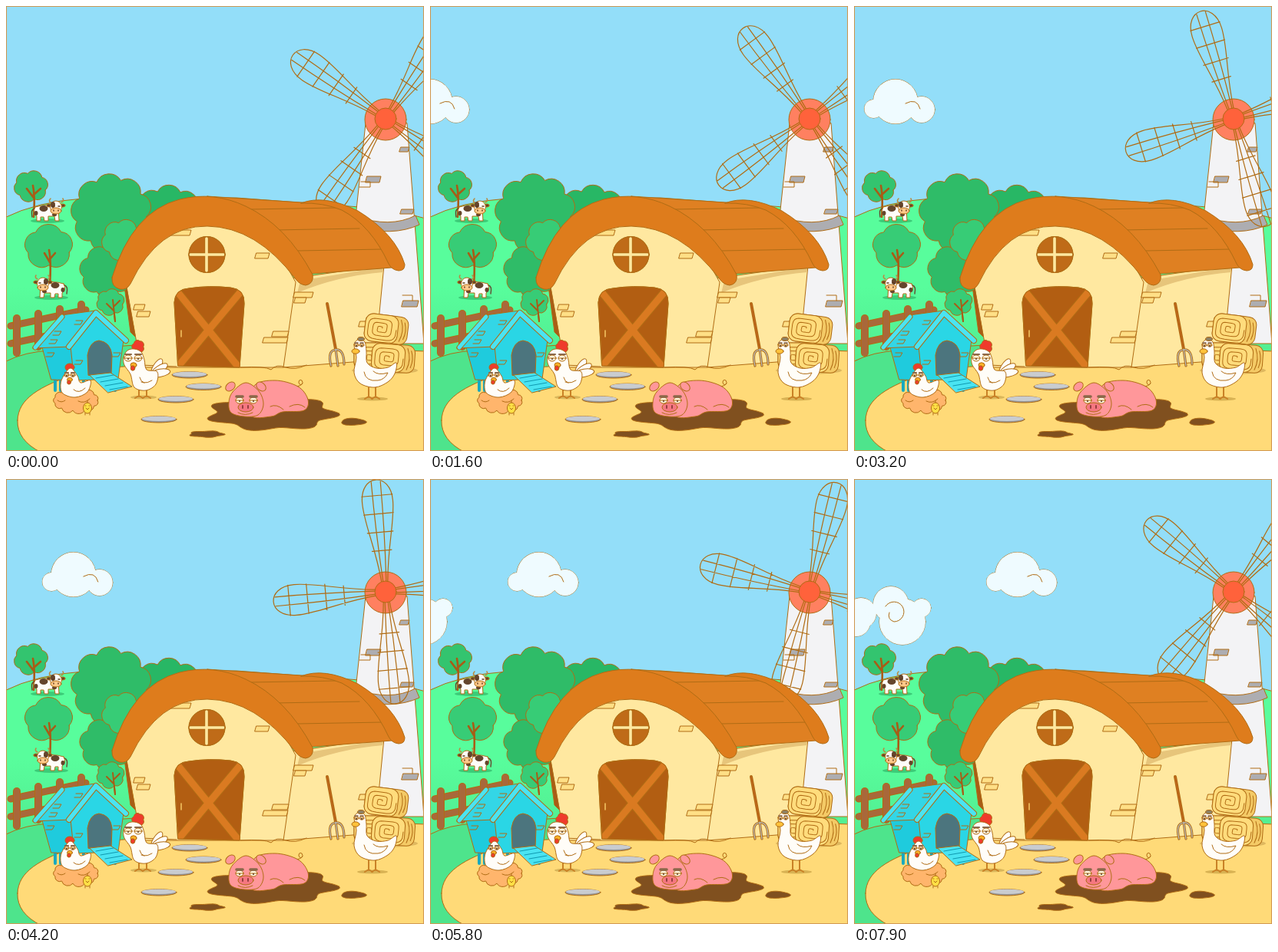
An HTML page that plays this animation: 544 px wide and 580 px high, repeating every 8 s.

```html
<!DOCTYPE html>
<html lang="en">
<head>
<meta charset="utf-8">
<title>Farm</title>
<style>
html, body { margin: 0; width: 100%; height: 100%; overflow: hidden; background: #93def9; }
svg { display: block; width: 544px; height: 580px; }
</style>
</head>
<body>
<svg id="stage" viewBox="0 0 544 580" fill="none" stroke="#b06c14" stroke-linejoin="round" stroke-linecap="round"></svg>
<script>
const LINE = '#b06c14', CREAM = '#ffe8a0', ROOF = '#de7c1c', WHITE = '#fffdf8', TRUNK = '#a85c16';
const RED = '#ef3b2c', PINK = '#ff979a', MUD = '#80501f', LEAF = '#2fbc68', LIGHT_LEAF = '#37cc76';
const { PI, cos, sin, sqrt, abs, sign } = Math;
const flat = 'stroke="none"';

// Shape helpers return SVG markup.
const range = n => [...Array(n).keys()];
const pen = (color, width) => `stroke="${color}" stroke-width="${width}"`;
const path = (d, fill = 'none', more = '') => `<path d="${d}" fill="${fill}" ${more}/>`;
const oval = (x, y, rx, ry, fill, more = '') => `<ellipse cx="${x}" cy="${y}" rx="${rx}" ry="${ry}" fill="${fill}" ${more}/>`;
const group = (body, more = '') => `<g ${more}>${body}</g>`;
const place = (body, x, y, rest = '') => group(body, `transform="translate(${x} ${y}) ${rest}"`);
const brick = (x, y, w, h = 7, fill = '#ffdf86') => path(`M${x} ${y}h${w}l-2 ${h}h${-w}z`, fill);

// A line with an outline on both sides.
const bar = (d, color, width) => path(d, 'none', pen(LINE, width + 2)) + path(d, 'none', pen(color, width));

// Points at even angles round an ellipse; size(a) scales the radius.
const around = (x, y, rx, ry, n, size = () => 1, turn = 0) => range(n).map(i => {
  const a = turn + i * 2 * PI / n, k = size(a);
  return [x + rx * k * cos(a), y + ry * k * sin(a)].map(v => +v.toFixed(1));
});

// Ring of n outward arcs that just fits inside an ellipse.
function puff(x, y, rx, ry, n, fill, turn = 0) {
  const fit = 1 / (cos(PI / n) + 0.62 * sin(PI / n));
  const p = around(x, y, rx * fit, ry * fit, n, undefined, turn);
  const arcs = p.map((a, i) => {
    const b = p[(i + 1) % n], r = 0.56 * Math.hypot(b[0] - a[0], b[1] - a[1]);
    return `A${r} ${r} 0 0 1 ${b}`;
  });
  return path(`M${p[0]}${arcs.join('')}z`, fill);
}

// Closed smooth curve through key points.
function smooth(points, fill, more) {
  const p = typeof points === 'string' ? points.split(' ').map(s => s.split(',').map(Number)) : points;
  const at = i => p[(i + p.length) % p.length];
  const handle = (i, k) => at(i).map((v, j) => v + k * (at(i + 1)[j] - at(i - 1)[j]) / 6);
  const d = p.map((_, i) => `C${handle(i, 1)} ${handle(i + 1, -1)} ${at(i + 1)}`).join('');
  return path(`M${p[0]}${d}z`, fill, more);
}

const blot = (x, y, rx, ry, waves, depth) =>
  smooth(around(x, y, rx, ry, 48, a => 1 + depth * sin(waves * a + 1)), MUD);

// Union of circles with a single outline.
const cloud = (circles, curl, id) => {
  const each = more => circles.map(([x, y, r]) => oval(x, y, r, r, '#effbff', more)).join('');
  return group(each('') + each(flat) + path(curl), `id="${id}"`);
};

const legs = (x, gap, top, base) => [x, x + gap].map(c =>
  path(`M${c} ${top}V${base - 2}M${c - 5} ${base}L${c} ${base - 3} ${c + 5} ${base}`, 'none', pen('#c98126', 2))).join('');

// Sleepy pair of eyes with heavy brows.
const eyes = (x, y, gap, r, brow = 2.2) => [x, x + gap].map(c =>
  oval(c, y, r, r * .8, '#fff6df') + path(`M${c - r} ${y}h${2 * r}`) + oval(c, y + 1, 1, 1, '#53351f', flat)
  + path(`M${c - r + 1} ${y - r}h${2 * r - 2}`, 'none', pen('#8b684a', brow))).join('');

function land() {
  return path('M-2 276Q40 255 100 251L300 250 460 262Q510 266 546 277V582H-2z', 'url(#grass)')
    + path('M-2 464Q25 450 60 449L200 440V582H-2z', '#4ee48c')
    + path('M15 540C16 512 42 496 95 478Q150 465 300 466L450 455Q500 447 546 450V582H46Q14 566 15 540z', '#ffda78');
}

function smallTrees() {
  const trunk = (x, base, top, w) => path(
    `M${x} ${base}Q${x + 2} ${top + 15} ${x - 1} ${top}M${x} ${top + 16}l${-w} -12M${x} ${top + 12}l${w} -8`, 'none', pen(TRUNK, 2.6));
  return puff(32.5, 235, 23, 20, 6, '#33c46f', .3) + trunk(36, 275, 234, 9)
    + puff(55.5, 314, 33, 28, 5, LIGHT_LEAF, .3) + trunk(57, 364, 318, 7);
}

function cow(x, y, face) {
  const spots = '#65452c';
  const body = path('M-17 -3Q-22 -2 -20 8', 'none', pen(spots, 1.4))
    + path('M-16 -5Q0 -10 14 -5L15 13H10L9 7H1V13H-4L-5 8H-9V13H-14L-14 7Q-20 3 -16 -5z', WHITE)
    + oval(-5, -3, 5.5, 4, spots, flat) + oval(-15, 3, 2.5, 3, spots, flat) + oval(9, 5, 3, 2, spots, flat);
  const head = path('M4 -11q-3 -2 0 -5M18 -11q4 -2 2 -5', 'none', pen('#b88b42', 1.6))
    + oval(2, -7, 3, 2, spots) + oval(20, -7, 3, 2, spots) + oval(11, -5, 7.5, 8, WHITE) + oval(7, -8, 3, 4, spots, flat)
    + oval(11, 0, 7, 4, '#ffc98a') + path('M8 -1v1M14 -1v1M7 -6h2M14 -6h2', 'none', pen('#5b371d', 1.4));
  return oval(x, y + 13, 22, 3, '#3ccb78', flat) + place(body + head, x, y, `scale(${face} 1)`);
}

function bigTrees() {
  return path('M154 365L162 425 173 436 171 400 163 350z', TRUNK)
    + puff(211, 280, 50, 46, 9, '#28b765', .2)
    + puff(137, 270, 53, 51, 9, LEAF, .1)
    + puff(131, 346, 36, 34, 7, LEAF, .2)
    + puff(152, 305, 28, 27, 6, LIGHT_LEAF, .3)
    + path('M142 411L139 383M140 397l-9 -9M141 391l7 -7', 'none', pen(TRUNK, 2))
    + puff(136, 386, 19, 17, 6, LIGHT_LEAF, .2)
    + path('M142 411L139 383M140 397l-9 -9M141 391l7 -7', 'none', pen(TRUNK, 2))
    + path('M158 362L172 431', 'none', pen('#8d4d16', 4));
}

function fence() {
  const wood = '#a9683a';
  const rails = [417, 440].map(y => bar(`M6 ${y}L104 ${y - 21}`, wood, 7)).join('');
  return rails + range(4).map(i => bar(`M${14 + 28 * i} ${407 - 6 * i}V${452 - 8 * i}`, wood, 8)).join('');
}

function tower() {
  const gray = '#adadb1';
  return path('M468 153L455 275 446 440H544L522 153z', '#f3f3f5')
    + path('M455 274Q500 290 533 273L538 285Q504 301 454 288z', gray)
    + brick(470, 222, 18, 8, gray) + brick(514, 184, 11, 6, gray)
    + brick(515, 265, 16, 6, gray) + brick(517, 384, 20, 8, gray)
    + path('M462 229h12v7h-14M516 377h13v7');
}

function windmill() {
  const bars = range(4).map(i => {
    const y = 54 + 24 * i, w = 20 * sin(y / 78);
    return `M${-w} ${-y}H${w}`;
  });
  const ribs = [-1, 1].map(s => `M${2 * s} -13Q${6 * s} -80 ${6 * s} -144`);
  const blade = path('M-4 -13C-8 -60 -20 -90 -20 -118C-20 -156 20 -156 20 -118C20 -90 8 -60 4 -13'
    + bars.join('') + ribs.join(''));
  const blades = range(4).map(i => group(blade, `transform="rotate(${90 * i})"`)).join('');
  return oval(494, 148, 27, 27, '#ff8060') + group(blades, 'id="blades" stroke-width="1.2"')
    + oval(494, 147, 14, 14, '#ff623b');
}

function barn() {
  const bricks = [[214, 292, 27], [326, 322, 17], [168, 389, 13], [172, 398, 16],
    [376, 373, 24], [377, 380, 14], [348, 424, 20], [336, 432, 31], [461, 411, 13]];
  const door = 'M219 386Q220 369 238 368Q264 364 292 367Q311 369 310 388L304 471 224 469z';
  const slats = range(3).map(i => {
    const x = 318 + 31 * i, y = 265 + 27 * i;
    return `M${x} ${y}L${x + 111} ${y - 2}`;
  });
  return path('M372 355L492 338 484 420 477 462 361 471z', CREAM)
    + path('M383 358L491 340V347Q430 352 379 374z', '#e7c57b', flat)
    + path('M157 365Q190 280 262 277Q340 285 377 360L361 471H176z', CREAM)
    + bricks.map(b => brick(...b)).join('')
    + path('M262 248L384 256Q460 250 502 341L398 349Q355 270 262 248z', '#df8022')
    + path(slats.join(''))
    + path('M384 257Q414 245 458 267Q507 297 519 337Q519 345 511 345Q502 344 498 336Q475 286 437 266Q413 256 384 257z', ROOF)
    + path('M138 354Q164 268 226 252Q270 241 312 261Q365 286 399 350Q401 362 390 364Q382 363 377 356Q326 288 262 287Q198 286 162 362Q157 371 148 369Q137 366 138 354z', ROOF)
    + oval(261.5, 324, 23.5, 23.5, '#bf6b18') + bar('M261 303V345M240 324H283', CREAM, 3.6)
    + oval(261.5, 324, 23.5, 23.5, 'none')
    + path(door, '#b25e12')
    + group(bar('M217 365L311 481M315 361L217 478', '#da7a21', 9), 'clip-path="url(#door)"')
    + `<clipPath id="door">${path(door)}</clipPath>` + path(door)
    + path('M228 423v8', 'none', pen('#f2c261', 1.6))
    + path('M175 468L222 470M305 471Q337 469 345 474Q352 466 364 471Q376 475 391 468');
}

function coop() {
  const edge = '#4ae4f2';
  const posts = [64, 71, 101, 142].map(x => `M${x} 484v17`).join('');
  const slats = range(4).map(i => `M${117 + 6 * i} ${485 + 5 * i}l23 -4`).join('');
  const tiles = [[63, 424], [91, 410], [58, 435], [140, 452], [54, 452], [91, 462]];
  return path(posts, 'none', pen('#19a9bf', 4))
    + path('M46 440H91V488L59 487z', '#1fcbdd') + path('M84 440L118 403 153 435 146 486 89 488z', '#2ad6e5')
    + path('M72 403L116 397 84 444 35 446z', '#33d6e6')
    + bar('M73 405L38 445', edge, 5) + bar('M82 444L117 400 156 436', edge, 6)
    + path('M107 481L106 455Q109 437 121 436Q136 438 138 455L137 481z', '#4c757e')
    + tiles.map(([x, y]) => path(`M${x} ${y}h9l-3 5h-8`)).join('')
    + path('M109 481L136 478 164 496 133 504z', edge) + path(slats, 'none', pen('#109bb2', 1.2));
}

function hens() {
  const orange = '#ffb329';
  const beak = (x, y, r) => oval(x, y, r, r * .8, orange) + oval(x - 1, y + r, r * .7, r * .8, RED);
  const sitting = puff(91, 514, 32, 15, 11, '#ffb56c') + oval(83, 471, 6, 5, RED)
    + smooth('75,482 84,472 93,482 97,491 110,488 106,503 90,510 74,505 71,493', WHITE)
    + eyes(79, 481, 8, 3) + beak(83, 487, 3.4)
    + path('M88 500Q95 506 103 498M67 514q5 4 10 0M94 515q8 4 15 -3');
  const chick = path('M103 530v3M109 530v3') + oval(106, 524, 5.5, 7, '#ffdf45')
    + path('M104 524l2 2 2-2M103 521h1M108 521h1M106 517v-3');
  const feathers = range(3).map(i => oval(10, 0, 13, 5, WHITE, `transform="translate(191 480) rotate(${-60 + 25 * i})"`)).join('');
  const rooster = oval(179, 510, 17, 2.5, '#d9b65b', flat) + legs(173, 10, 498, 511)
    + feathers + puff(172, 444, 8, 9, 5, RED)
    + smooth('153,458 158,449 167,447 176,451 180,461 183,474 197,477 195,493 182,501 167,497 162,480 154,468', WHITE)
    + eyes(159, 459, 13, 5) + beak(166, 468, 4) + path('M174 484Q177 496 190 488M176 490l4 1');
  return sitting + chick + rooster;
}

const stones = () => [[239, 480], [257, 495.5], [221, 512], [199, 538]].map(([x, y]) =>
  oval(x, y + .8, 23, 4.2, '#969696') + oval(x, y - .3, 22, 3.2, '#c9ccd0', flat)).join('');

function pig() {
  const ear = [-1, 1].map(s => oval(312 + 20 * s, 496, 7, 5, PINK, `transform="rotate(${40 * s} ${312 + 20 * s} 496)"`)).join('');
  return blot(346, 531, 80, 21, 7, .11) + blot(261, 558, 22, 4, 5, .1) + blot(452, 542, 16, 4.5, 3, .08)
    + path('M378 496Q389 494 385 488Q381 486 381 491Q383 496 386 492')
    + smooth('322,496 350,488 380,496 393,513 388,527 360,529 345,535 318,533', PINK)
    + ear + smooth('295,503 312,491 329,502 335,519 328,533 310,535 293,530 290,517', PINK)
    + eyes(304, 514, 18, 5, 3.6) + oval(312, 523, 10, 6, '#f57780')
    + path('M308 521v3M315 521v3', 'none', pen('#963e40', 2))
    + path('M302 530Q311 535 321 530M344 522Q352 518 361 526M369 522Q381 516 389 523');
}

const fork = () => bar('M418 388L429 447', '#bd661b', 2)
  + bar('M423 469Q418 449 429 448Q440 447 440 467M429 447L432 469', '#b8c0c6', 1.2);

// Rolled hay: a squarish spiral on the near face.
function bale(x, y, tilt) {
  const soft = v => sign(v) * sqrt(abs(v));
  const spiral = range(70).map(i => {
    const a = i * .27, r = 1 - i / 75;
    return [-6 + 20 * r * soft(cos(a)), 16 * r * soft(sin(a))].map(v => v.toFixed(1));
  });
  const box = (left, w, h, fill) => `<rect x="${left}" y="${-h / 2}" width="${w}" height="${h}" rx="10" fill="${fill}"/>`;
  return place(box(-27, 56, 36, '#f4ca66') + box(-27, 43, 36, '#ffdc7c')
    + path('M' + spiral.join('L')) + path('M19 -14q6 14 0 28M24 -11q4 11 0 22'), x, y, `rotate(${tilt})`);
}

function goose() {
  return oval(477, 512, 20, 2.5, '#d8b253', flat) + legs(472, 9, 493, 512)
    + smooth('453,441 460,434 467,438 469,450 470,465 482,472 497,471 508,465 506,479 497,490 480,497 461,492 453,478 456,458', WHITE)
    + oval(462, 434, 4.5, 2.5, '#8e8062') + eyes(456, 442, 7, 2.8, 1.8) + oval(455, 450, 5, 3.2, '#ffc23b')
    + path('M466 477Q468 490 484 488Q493 487 497 478Q484 482 478 476');
}

document.getElementById('stage').innerHTML =
  `<defs><linearGradient id="grass" x1="0" y1="0" x2="0" y2="1">
    <stop offset=".35" stop-color="#58fd9c"/><stop offset=".75" stop-color="#4fe68d"/></linearGradient></defs>`
  + path('M0 0H544V580H0z', '#93def9', flat)
  + cloud([[25.5, 134, 12], [54, 124.5, 29], [88, 135, 17]], 'M67 127Q82 119 86 134', 'cloudA')
  + cloud([[48, 163, 23], [88, 168, 12], [63, 186, 30], [9, 175, 20], [3, 187, 18], [-20, 180, 14]],
    'M41 166A13 13 0 1 1 52 186Q43 183 46 174', 'cloudB')
  + land() + smallTrees() + cow(54, 267, 1) + cow(59, 367, -1)
  + bigTrees() + fence() + tower() + windmill() + barn()
  + coop() + stones() + hens() + pig() + fork()
  + oval(493, 475, 43, 5, '#dfb85f', flat) + bale(494, 421, 7) + bale(480, 457, 0) + bale(503, 459, 4) + goose()
  + path('M.5 .5H543.5V579.5H.5z', 'none', pen('#d29a55', 1.2));

const [blades, cloudA, cloudB] = ['blades', 'cloudA', 'cloudB'].map(id => document.getElementById(id));
const LOOP = 8000, STEP = 100, DRIFT = 33.8, SPIN = 12;
const start = performance.now();

function draw() {
  const ms = Math.max(0, performance.now() - start) % LOOP;
  const t = Math.floor(ms / STEP) * STEP / 1000;
  blades.setAttribute('transform', `translate(494 147) rotate(${-55.5 + SPIN * t})`);
  cloudA.setAttribute('transform', `translate(${(t - 3.2) * DRIFT} 0)`);
  cloudB.setAttribute('transform', `translate(${(t - 7.9) * DRIFT} 0)`);
  requestAnimationFrame(draw);
}
draw();
</script>
</body>
</html>
```
